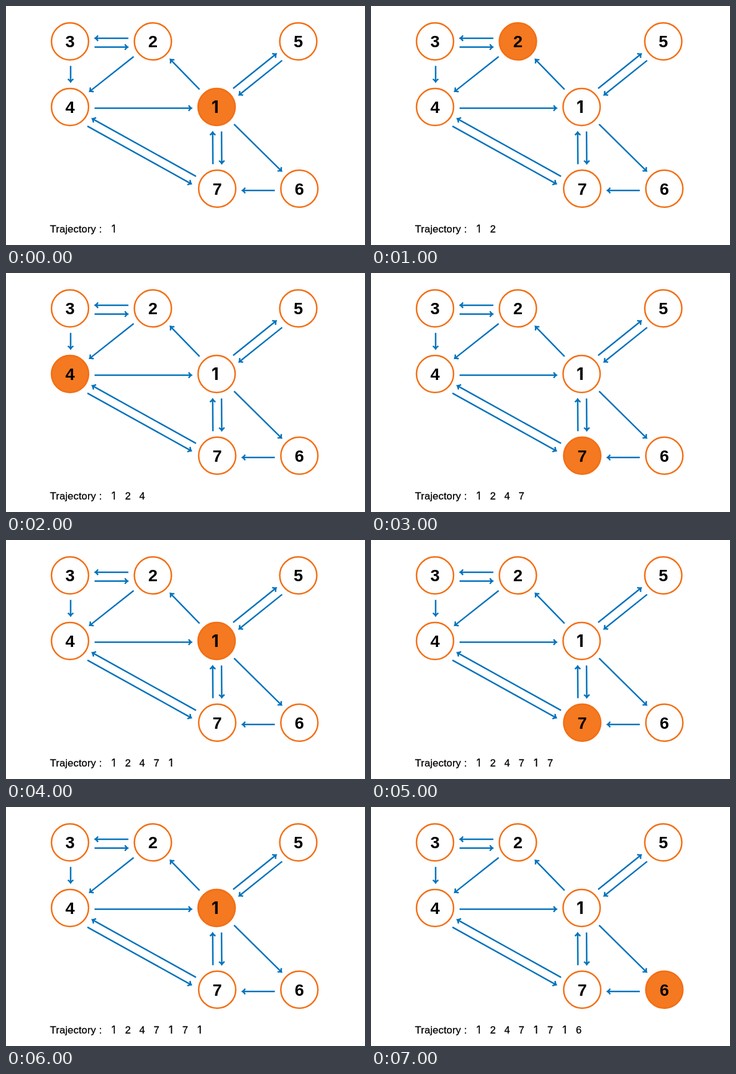
Animation of 600 by 400 pixels, one loop 8 s. Source, as an HTML page:

```html
<!DOCTYPE html>
<html lang="en">
<head>
<meta charset="utf-8">
<title>Graph trajectory</title>
<style>
  html, body { margin: 0; width: 100%; height: 100%; overflow: hidden; background: #fff; }
  svg { display: block; width: 600px; height: 400px; }
  text { font-family: "Liberation Sans", Arial, sans-serif; fill: #000; }
  .node { fill: #fff; stroke: #f36f15; stroke-width: 2.5; }
  .num { font-size: 28px; font-weight: 700; text-anchor: middle; }
  .arrow { fill: none; stroke: #0072bc; stroke-width: 2.5; }
  .label, .step { font-size: 17px; stroke: #000; stroke-width: .3px; }
  .label { letter-spacing: .2px; }
  .step { text-anchor: middle; }
  /* a "1" without a foot */
  .one { font-family: Inter, Arial, sans-serif; }
</style>
</head>
<body>
<svg id="stage" viewBox="0 0 600 400">
  <text class="label" x="73.6" y="379">Trajectory :</text>
</svg>
<script>
const STEP = 1000;
const GAP = 41;    // from a node's centre to an arrow's end
const LANE = 7.4;  // half the distance between paired arrows
const route = [1, 2, 4, 7, 1, 7, 1, 6];
const nodes = {
  1: [352, 169], 2: [245.5, 59.3], 3: [107, 59.3], 4: [107, 169],
  5: [488.5, 59.3], 6: [490.3, 305.8], 7: [353, 305.8]
};
const stage = document.getElementById('stage');

function add(tag, attrs, text = '') {
  const el = document.createElementNS('http://www.w3.org/2000/svg', tag);
  for (const key in attrs) el.setAttribute(key, attrs[key]);
  el.textContent = text;
  return stage.appendChild(el);
}

function digit(kind, n, x, y) {
  return add('text', { class: n == 1 ? kind + ' one' : kind, x, y }, n);
}

// Arrow between two nodes, moved to its right by side.
function arrow(from, to, side = 0) {
  const [x1, y1] = nodes[from], [x2, y2] = nodes[to];
  const len = Math.hypot(x2 - x1, y2 - y1);
  const angle = Math.atan2(y2 - y1, x2 - x1) * 180 / Math.PI;
  const tip = len - GAP;
  add('path', {
    class: 'arrow',
    transform: `translate(${x1} ${y1}) rotate(${angle}) translate(${tip} ${side})`,
    d: `M${GAP - tip} 0H-1.5M-5.8 -4.6Q-4 -1.7 -1.2 0Q-4 1.7 -5.8 4.6`
  });
}

function pair(a, b, lane, shift) {
  arrow(a, b, lane + shift);
  arrow(b, a, lane - shift);
}

// Holds one value per step, looping over the whole route.
function play(el, prop, valueAt) {
  const frames = route.map((n, i) => ({
    [prop]: valueAt(n, i), offset: i / route.length, easing: 'step-end'
  }));
  frames.push({ ...frames[route.length - 1], offset: 1 });
  el.animate(frames, { duration: STEP * route.length, iterations: Infinity });
}

arrow(1, 2);
arrow(1, 6);
arrow(2, 4);
arrow(3, 4, -1);
arrow(4, 1, 2);
arrow(6, 7, -3);
pair(3, 2, LANE, 2);
pair(4, 7, LANE, 6.5);
pair(1, 5, -LANE, 0.5);
pair(1, 7, -LANE, -0.5);

for (const id in nodes) {
  const [cx, cy] = nodes[id];
  const ring = add('circle', { class: 'node', cx, cy, r: 31 });
  play(ring, 'fill', n => n == id ? '#f47920' : '#fff');
  digit('num', id, id == 1 ? cx - 2.5 : cx, cy + 10);
}

route.forEach((n, k) => {
  const el = digit('step', n, 179.7 + k * 23.95, 379);
  play(el, 'opacity', (_, i) => i >= k ? 1 : 0);
});
</script>
</body>
</html>
```
